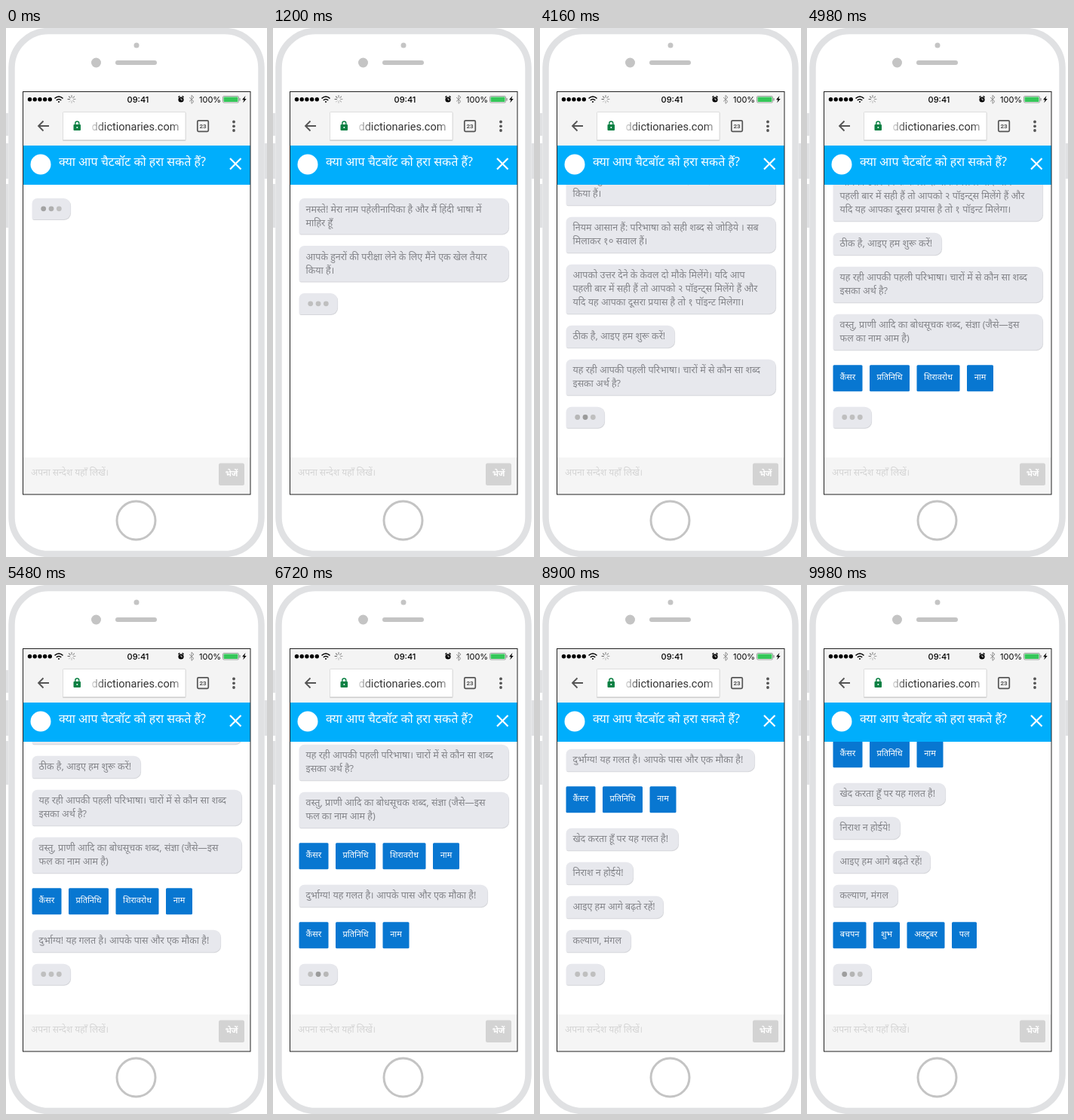
These frames come from a looping animation (346 by 702 pixels, 10000 ms). An HTML page:

```html
<!DOCTYPE html>
<html lang="hi">
<head>
<meta charset="utf-8">
<style>
html, body { margin: 0; width: 100%; height: 100%; overflow: hidden; background: #fff; }
svg { display: block; font-family: "Noto Sans", "Noto Sans Devanagari", sans-serif; }
.message { font-size: 12.5px; fill: #838489; }
.option { font-size: 11px; fill: #fff; text-anchor: middle; }
.status { font: 500 11px Inter, sans-serif; }
.url { font: 14.5px Roboto, sans-serif; }
.tabs { font: 700 8px Roboto, sans-serif; }
</style>
</head>
<body>
<svg width="346" height="702" viewBox="0 0 346 702">
  <defs>
    <clipPath id="chatArea"><rect x="23" y="208" width="301" height="362"/></clipPath>
    <linearGradient id="urlFade" gradientUnits="userSpaceOnUse" x1="112" x2="236">
      <stop offset="0" stop-color="#333" stop-opacity=".1"/>
      <stop offset=".16" stop-color="#333"/>
      <stop offset=".86" stop-color="#333"/>
      <stop offset="1" stop-color="#333" stop-opacity=".1"/>
    </linearGradient>
  </defs>

  <!-- Phone body -->
  <path d="M1.5 113v30M1.5 153v47M1.5 207v58M344.5 153v47" stroke="#e0e1e3" stroke-width="3"/>
  <rect x="7.5" y="4" width="331" height="694" rx="49" fill="#fff" stroke="#e0e1e3" stroke-width="8.5"/>
  <g fill="#c4c4c4">
    <circle cx="173" cy="23" r="3.5"/>
    <circle cx="119.5" cy="46" r="6.5"/>
    <rect x="145" y="43" width="55" height="6" rx="3"/>
  </g>
  <circle cx="172.5" cy="653.5" r="25.5" fill="none" stroke="#c4c4c4" stroke-width="3"/>

  <rect x="23" y="85" width="301" height="71" fill="#f4f4f4"/>

  <!-- Status bar -->
  <g id="signal"></g>
  <g fill="none" stroke="#000" stroke-width="1.6">
    <path d="M64.5 93.5q5.5-5 11 0M66.8 96q3.2-3 6.4 0M69 98h2"/>
  </g>
  <g id="spinner" stroke-linecap="round"></g>
  <g class="status">
    <text x="175" y="98.5" text-anchor="middle">09:41</text>
    <text x="256" y="98.5" font-weight="400">100%</text>
  </g>
  <circle cx="232" cy="95" r="3.6"/>
  <path d="M228.5 92l1.8-1.8M235.5 92l-1.8-1.8" stroke="#000" stroke-width="1.3"/>
  <path d="M232 93v2.3h2" fill="none" stroke="#fff" stroke-width=".8"/>
  <path d="M243 92l6 5.5-3 2.8v-11l3 2.7-6 5.5" fill="none" stroke="#888" stroke-width=".9"/>
  <rect x="287.5" y="90.5" width="21" height="8.5" rx="1.5" fill="#fff" stroke="#888" stroke-width=".8"/>
  <rect x="288.5" y="91.5" width="19" height="6.5" rx=".8" fill="#35c759"/>
  <path d="M310 93v3.5" stroke="#888" stroke-width="1.2"/>
  <path d="M317.5 90l-4.5 5.3h2.5l-1.3 4 4.5-5.3h-2.5z"/>

  <!-- Browser bar -->
  <path d="M57 130H43.5M49.5 123.5l-6.5 6.5 6.5 6.5" fill="none" stroke="#555" stroke-width="1.8"/>
  <rect x="75" y="111.5" width="163.5" height="38.5" rx="1.5" fill="#d2d2d2"/>
  <rect x="75.5" y="111.5" width="162.5" height="37" rx="1" fill="#fff" stroke="#dedede"/>
  <rect x="89.5" y="128" width="9.5" height="8" rx="1" fill="#0a8043"/>
  <path d="M91.8 128.5v-2a2.5 2.5 0 0 1 5 0v2" fill="none" stroke="#0a8043" stroke-width="1.4"/>
  <circle cx="94.3" cy="132" r="1" fill="#fff"/>
  <text class="url" x="113.5" y="135.5" fill="url(#urlFade)">ddictionaries.com</text>
  <rect x="253.8" y="122.8" width="14.5" height="14.5" rx="1.5" fill="none" stroke="#555" stroke-width="1.7"/>
  <text class="tabs" x="261" y="133" fill="#555" text-anchor="middle">23</text>
  <g fill="#555"><circle cx="302" cy="124.5" r="1.9"/><circle cx="302" cy="130.3" r="1.9"/><circle cx="302" cy="136" r="1.9"/></g>

  <!-- Conversation -->
  <rect x="23" y="208" width="301" height="362" fill="#fff"/>
  <g clip-path="url(#chatArea)"><g id="chat"></g></g>

  <rect x="23" y="156" width="301" height="52" fill="#00aefc"/>
  <circle cx="46" cy="181" r="13.5" fill="#fff"/>
  <text x="70" y="183" font-size="16" fill="#fff">क्या आप चैटबॉट को हरा सकते हैं?</text>
  <path d="M297 173l14.5 14.5M311.5 173L297 187.5" stroke="#fff" stroke-width="2.2"/>

  <rect x="23" y="570" width="301" height="49" fill="#f5f5f5"/>
  <text x="33" y="594" font-size="12" fill="#d4d4d4">अपना सन्देश यहाँ लिखें।</text>
  <rect x="282" y="577.5" width="34" height="29.5" rx="2.5" fill="#d3d3d3"/>
  <text x="299" y="594.5" font-size="10.5" font-weight="700" fill="#fff" text-anchor="middle">भेजें</text>
  <rect x="22.5" y="84.5" width="301.5" height="534.5" fill="none" stroke="#222"/>
</svg>

<script>
const LOOP = 10000, LEFT = 34.5, TOP = 226, DOTS_LIMIT = 502.7;

// Each entry: time shown, then width and lines, or a row of [label, width] options.
const script = [
  { at: 500, width: 278, lines: ["नमस्ते! मेरा नाम पहेलीनायिका है और मैं हिंदी भाषा में", "माहिर हूँ"] },
  { at: 1120, width: 278, lines: ["आपके हुनरों की परीक्षा लेने के लिए मैंने एक खेल तैयार", "किया हैं।"] },
  { at: 1750, width: 278, lines: ["नियम आसान हैं: परिभाषा को सही शब्द से जोड़िये । सब", "मिलाकर १० सवाल हैं।"] },
  { at: 2440, width: 278, lines: ["आपको उत्तर देने के केवल दो मौके मिलेंगे। यदि आप", "पहली बार में सही हैं तो आपको २ पॉइन्ट्स मिलेंगे हैं और", "यदि यह आपका दूसरा प्रयास है तो १ पॉइन्ट मिलेगा।"] },
  { at: 3100, width: 144, lines: ["ठीक है, आइए हम शुरू करें!"] },
  { at: 3580, width: 278, lines: ["यह रही आपकी पहली परिभाषा। चारों में से कौन सा शब्द", "इसका अर्थ है?"] },
  { at: 4300, width: 278, lines: ["वस्तु, प्राणी आदि का बोधसूचक शब्द, संज्ञा (जैसे—इस", "फल का नाम आम है)"] },
  { at: 4760, options: [["कैंसर", 39], ["प्रतिनिधि", 53], ["शिरावरोध", 57], ["नाम", 35]] },
  { at: 5300, width: 250, lines: ["दुर्भाग्य! यह गलत है। आपके पास और एक मौका है!"] },
  { at: 6080, options: [["कैंसर", 39], ["प्रतिनिधि", 53], ["नाम", 35]] },
  { at: 6750, width: 149, lines: ["खेद करता हूँ पर यह गलत है!"] },
  { at: 7420, width: 89, lines: ["निराश न होईये!"] },
  { at: 8140, width: 129, lines: ["आइए हम आगे बढ़ते रहें!"] },
  { at: 8800, width: 86, lines: ["कल्याण, मंगल"] },
  { at: 9500, options: [["बचपन", 44], ["शुभ", 35], ["अक्टूबर", 50], ["पल", 33]] }
];

const byId = id => document.getElementById(id);
const grey = level => `rgb(${level},${level},${level})`;

function add(parent, tag, attrs = {}, text = "") {
  const node = document.createElementNS("http://www.w3.org/2000/svg", tag);
  for (const key in attrs) node.setAttribute(key, attrs[key]);
  node.textContent = text;
  return parent.appendChild(node);
}

function addBubble(parent, width, height) {
  const d = `M${LEFT} 7a7 7 0 0 1 7-7h${width - 16}a9 9 0 0 1 9 9v${height - 18}a9 9 0 0 1-9 9h${11 - width}a2 2 0 0 1-2-2z`;
  add(parent, "path", { d, fill: "#d5d6da", transform: "translate(.6 1)" });
  add(parent, "path", { d, fill: "#e7e8ed" });
}

const chat = byId("chat");
let y = TOP;
for (const item of script) {
  item.node = add(chat, "g", { transform: `translate(0 ${y})` });
  if (item.lines) {
    addBubble(item.node, item.width, 11.5 + 18 * item.lines.length);
    item.lines.forEach((line, i) =>
      add(item.node, "text", { class: "message", x: 43.5, y: 18.5 + 18 * i }, line));
    y += 27 + 18 * item.lines.length;
  } else {
    let x = LEFT;
    for (const [label, width] of item.options) {
      add(item.node, "rect", { x, y: 4.5, width, height: 35, rx: 1.5, fill: "#0877d1" });
      add(item.node, "text", { class: "option", x: x + width / 2, y: 24.5 }, label);
      x += width + 9.5;
    }
    y += 60;
  }
  item.end = y;
}

const typing = add(chat, "g");
addBubble(typing, 51, 28);
const dots = [49.7, 60, 70.3].map(cx => add(typing, "circle", { cx, cy: 13.8, r: 3.4 }));

for (let i = 0; i < 5; i++) add(byId("signal"), "circle", { cx: 31.5 + 6.7 * i, cy: 94.7, r: 2.7 });
for (let i = 0; i < 8; i++) {
  add(byId("spinner"), "path", {
    d: "M87 92v-2.5", stroke: grey(90 + 16 * i), transform: `rotate(${i * 45 - 90} 87 94.5)`
  });
}

function draw(now) {
  const t = now % LOOP;
  let dotsY = TOP, since = script[script.length - 1].at - LOOP;
  for (const item of script) {
    const shown = t >= item.at;
    item.node.style.display = shown ? "" : "none";
    if (shown) { dotsY = item.end; since = item.at; }
  }
  chat.setAttribute("transform", `translate(0 ${Math.min(0, DOTS_LIMIT - dotsY)})`);
  typing.setAttribute("transform", `translate(0 ${dotsY})`);

  const phase = (t - since) % 1000;
  dots.forEach((dot, i) => {
    const glow = Math.max(0, 1 - Math.abs(phase - 440 - 170 * i) / 170);
    dot.setAttribute("fill", grey(Math.round(191 - 44 * glow)));
  });
  requestAnimationFrame(draw);
}
requestAnimationFrame(draw);
</script>
</body>
</html>
```
